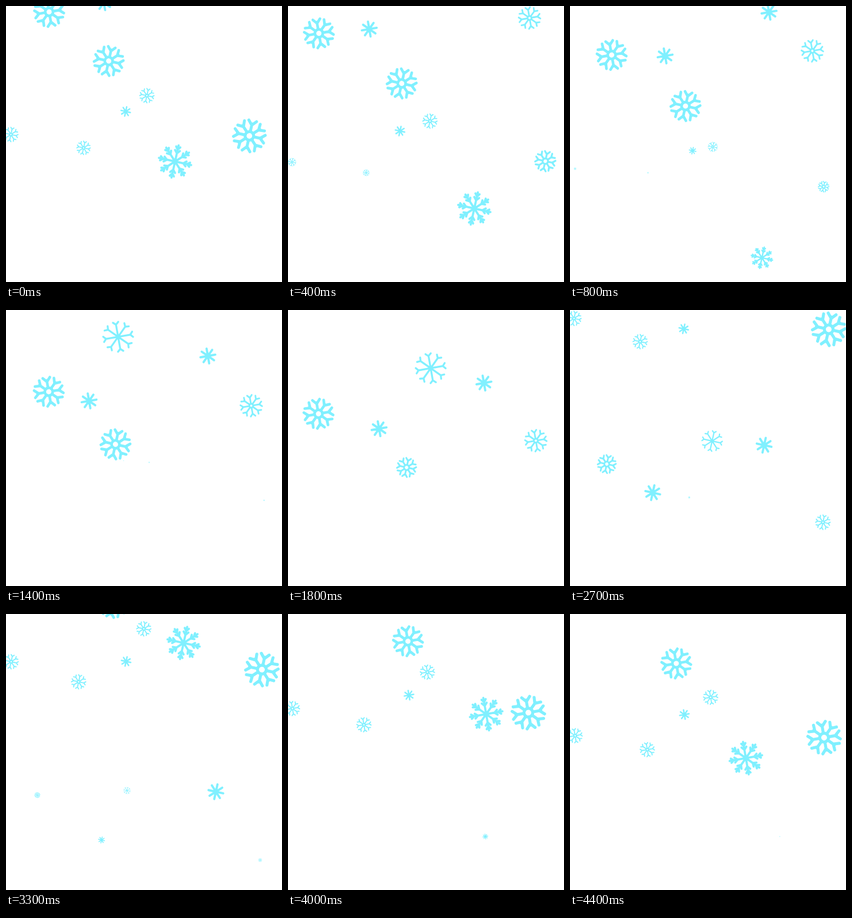
Animation, 480 px wide and 480 px high, one loop 4500 ms. Source, as an HTML page with a canvas:

```html
<!DOCTYPE html>
<html lang="en">
<head>
<meta charset="utf-8">
<title>Snowfall</title>
<style>
  html, body { margin: 0; width: 100%; height: 100%; overflow: hidden; background: #fff; }
  canvas { display: block; }
</style>
</head>
<body>
<canvas id="stage" width="480" height="480"></canvas>
<script>
const LOOP = 4500, STEP = 100, DEG = Math.PI / 180;
const SPIN = -.225, REST = 600, DRAG = .001;
const ctx = document.getElementById('stage').getContext('2d');

// Shapes have radius 1 and eight equal arms along +x, with mirrored barbs.
function arms(width, hub, length, barbs = []) {
  ctx.lineWidth = width;
  ctx.beginPath();
  for (let i = 0; i < 8; i++) {
    ctx.moveTo(hub, 0);
    ctx.lineTo(length, 0);
    for (const [root, tip, spread] of barbs) {
      ctx.moveTo(tip, -spread);
      ctx.lineTo(root, 0);
      ctx.lineTo(tip, spread);
    }
    ctx.rotate(45 * DEG);
  }
  ctx.stroke();
  if (!hub) return;
  ctx.beginPath();
  ctx.arc(0, 0, hub, 0, 2 * Math.PI);
  ctx.stroke();
}

const ring = () => arms(.17, .25, .72, [[.64, .9, .23]]);
const lace = () => arms(.14, .17, .74, [[.68, .9, .2]]);
const spoke = () => arms(.12, 0, .8, [[.78, .93, .17]]);
const fern = () => arms(.125, 0, .94, [[.48, .64, .14], [.7, .85, .12]]);
const star = () => arms(.26, 0, .87);

// Each flake reaches the height ground, rests there and is gone at end.
const flakes = [
  { shape: ring, size: 27.5, end: 7414, ground: 326, speed: .102, x: 193, sway: 16, phase: 94 },
  { shape: ring, size: 27.5, end: 3777, ground: 315, speed: .099, x: 64, sway: 11, period: 720 },
  { shape: ring, size: 30.5, end: 6050, ground: 331, speed: .112, x: 433, sway: 17, period: 540, phase: 5 },
  { shape: fern, size: 30.5, end: 6490, ground: 572, speed: .235, x: 318, sway: 28, phase: 89 },
  { shape: lace, size: 13.5, end: 5595, ground: 283, speed: .121, x: 8 },
  { shape: lace, size: 13.5, end: 5495, ground: 290, speed: .11, x: 128, sway: 8, period: 6000, phase: 60 },
  { shape: lace, size: 13.5, end: 6078, ground: 265, speed: .113, x: 244, sway: 5, period: 6000, phase: 12 },
  { shape: lace, size: 20.5, end: 3660, ground: 428, speed: .165, x: 431, sway: 11, period: 6000, phase: 162 },
  { shape: spoke, size: 27.5, end: 3845, ground: 307, speed: .147, x: 253, sway: 58, period: 1700, phase: -116 },
  { shape: star, size: 9.5, end: 6020, ground: 262, speed: .086, x: 203, sway: 11, period: 720, phase: 208 },
  { shape: star, size: 15, end: 3894, ground: 393, speed: .128, x: 157, sway: 16, phase: 35 },
  { shape: star, size: 15, end: 4520, ground: 387, speed: .127, x: 351, sway: 14, phase: -17 },
];

function paint({ shape, size, end, ground, speed, x, sway = 1, period = 1080, phase = 0 }, t) {
  if (t >= end) return;
  const toLand = Math.max(0, end - REST - t);
  const height = speed * toLand * (1 - DRAG * speed ** 2 * toLand);
  const meltTime = 600 + 32 * size;
  const scale = size * Math.min(1, (end - t) / meltTime) ** 1.5;
  ctx.save();
  ctx.translate(x + sway * Math.cos((t / period * 360 + phase) * DEG), ground - height);
  ctx.rotate((35 + SPIN * t) * DEG);
  ctx.scale(scale, scale);
  shape();
  ctx.restore();
}

const start = performance.now();

function frame() {
  const t = Math.floor((performance.now() - start) % LOOP / STEP) * STEP;
  ctx.clearRect(0, 0, 480, 480);
  ctx.strokeStyle = '#80f0ff';
  ctx.lineCap = ctx.lineJoin = 'round';
  for (const flake of flakes) {
    paint(flake, t);
    paint(flake, t + LOOP);
  }
  requestAnimationFrame(frame);
}

frame();
</script>
</body>
</html>
```
